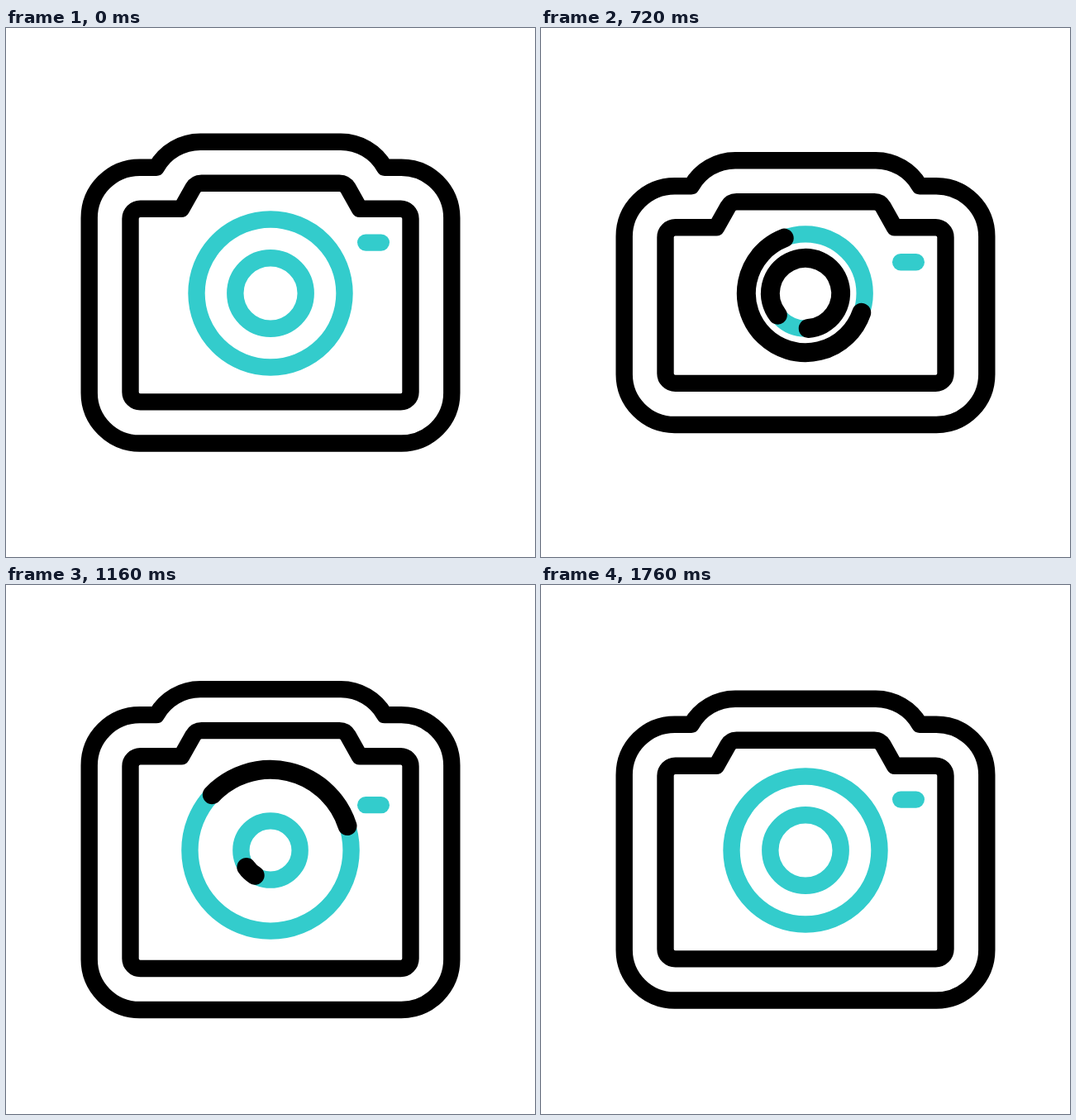
An HTML page that plays this animation: 640 px wide and 640 px high, repeating every 2.04 s.

```html
<!DOCTYPE html>
<html lang="en">
<head>
<meta charset="utf-8">
<title>Camera</title>
<style>
html, body { margin: 0; width: 100%; height: 100%; overflow: hidden; background: #fff; }
svg { display: block; width: 100vw; height: 100vh; }
path, circle { fill: none; stroke: #000; stroke-width: 20.4; stroke-linecap: round; stroke-linejoin: round; }
.teal { stroke: #33cccc; }
.sweep { stroke-width: 23; }
</style>
</head>
<body>
<svg viewBox="0 0 640 640">
  <path id="shell"/>
  <path id="frame"/>
  <path id="button" class="teal" d="M435.2 259.6H453.8"/>
  <circle id="bigRing" class="teal" cx="320" cy="321"/>
  <circle id="smallRing" class="teal" cx="320" cy="321"/>
  <path id="bigSweep" class="sweep"/>
  <path id="smallSweep" class="sweep"/>
  <g id="rays"></g>
</svg>
<script>
const LOOP = 2040, STEP = 40;
const CX = 320, CY = 321;
const RAY_LENGTH = 28;
const $ = id => document.getElementById(id);

const clamp = u => Math.max(0, Math.min(1, u));
const smooth = u => u * u * (3 - 2 * u);
const ease = (t, from, to) => smooth(clamp((t - from) / (to - from)));

// Eased value through a list of key times and values.
function track(t, times, values) {
  let v = values[0];
  for (let i = 1; i < times.length; i++) {
    v += (values[i] - values[i - 1]) * ease(t, times[i - 1], times[i]);
  }
  return v;
}

const BODY_TIMES = [362, 672, 1050, 1375, 1740];
const CORE_TIMES = [222, 532, 910, 1235, 1600];

// start point, direction, time of departure
const RAYS = [
  [315.5, 78, 0, -1, 1190],
  [239, 109, -0.707, -0.707, 1190],
  [391.5, 110.5, 0.714, -0.7, 1190],
  [315.5, 568, 0, 1, 1288],
  [239.5, 536, -0.69, 0.724, 1288],
  [392, 537, 0.707, 0.707, 1288]
].map(([x, y, dx, dy, start]) => {
  const el = document.createElementNS("http://www.w3.org/2000/svg", "path");
  el.setAttribute("class", "teal");
  $("rays").appendChild(el);
  return { el, x, y, dx, dy, start };
});

function shellPath(s) {
  const shoulder = 168.7 + s, top = 137.7 + s, bottom = 502.5 - s;
  return `M100.7 ${shoulder + 61}A61 61 0 0 1 161.7 ${shoulder}H181.9
    A61 61 0 0 1 235 ${top}H405A61 61 0 0 1 458.1 ${shoulder}H478.3
    A61 61 0 0 1 539.3 ${shoulder + 61}V${bottom - 61}
    A61 61 0 0 1 478.3 ${bottom}H161.7A61 61 0 0 1 100.7 ${bottom - 61}Z`;
}

function framePath(s) {
  const shoulder = 218.8 + s, top = 187.7 + s, bottom = 452.4 - s;
  return `M150.5 ${shoulder + 12}A12 12 0 0 1 162.5 ${shoulder}H212.2
    L226.3 ${top + 6}A12 12 0 0 1 236.6 ${top}H403.4
    A12 12 0 0 1 413.7 ${top + 6}L427.8 ${shoulder}H477.5
    A12 12 0 0 1 489.5 ${shoulder + 12}V${bottom - 12}
    A12 12 0 0 1 477.5 ${bottom}H162.5A12 12 0 0 1 150.5 ${bottom - 12}Z`;
}

// Arc between two angles in degrees from the top; dir 1 is clockwise.
function arcPath(r, from, to, dir) {
  if (to - from < 0.3) return "";
  const at = deg => {
    const a = deg * Math.PI / 180;
    return `${CX + dir * r * Math.sin(a)} ${CY - r * Math.cos(a)}`;
  };
  const large = to - from > 180 ? 1 : 0;
  return `M${at(from)}A${r} ${r} 0 ${large} ${dir > 0 ? 1 : 0} ${at(to)}`;
}

function sweepPath(t, r, turn, head, tail, dir) {
  return arcPath(r, turn + 360 * ease(t, tail, tail + 637),
    turn + 360 * ease(t, head, head + 637), dir);
}

function rayPath(t, { x, y, dx, dy, start }) {
  const head = RAY_LENGTH * ease(t, start, start + 225);
  const tail = RAY_LENGTH * ease(t, start + 108, start + 333);
  if (head - tail < 0.2) return "";
  return `M${x + dx * tail} ${y + dy * tail}L${x + dx * head} ${y + dy * head}`;
}

function draw(t) {
  const squash = track(t, BODY_TIMES, [0, 24.7, -24.7, 24.7, 0]);
  const drop = track(t, BODY_TIMES, [0, 24.7, 0, 24.7, 0]);
  const big = track(t, BODY_TIMES, [89.5, 70, 107.6, 70, 89.5]);
  const small = track(t, CORE_TIMES, [42.7, 33, 52.4, 33, 42.7]);

  $("shell").setAttribute("d", shellPath(squash));
  $("frame").setAttribute("d", framePath(squash));
  $("button").setAttribute("transform", `translate(0 ${drop})`);
  $("bigRing").setAttribute("r", big);
  $("smallRing").setAttribute("r", small);

  const bigTurn = 0.0575 * (t - 353);
  const smallTurn = 180 + 0.0595 * (t - 238);
  $("bigSweep").setAttribute("d", sweepPath(t, big, bigTurn, 342, 768, -1));
  $("smallSweep").setAttribute("d", sweepPath(t, small, smallTurn, 202, 621, 1));

  for (const ray of RAYS) ray.el.setAttribute("d", rayPath(t, ray));
}

const began = performance.now();
function tick() {
  const t = (performance.now() - began) % LOOP;
  draw(Math.floor(t / STEP) * STEP);
  requestAnimationFrame(tick);
}
tick();
</script>
</body>
</html>
```
